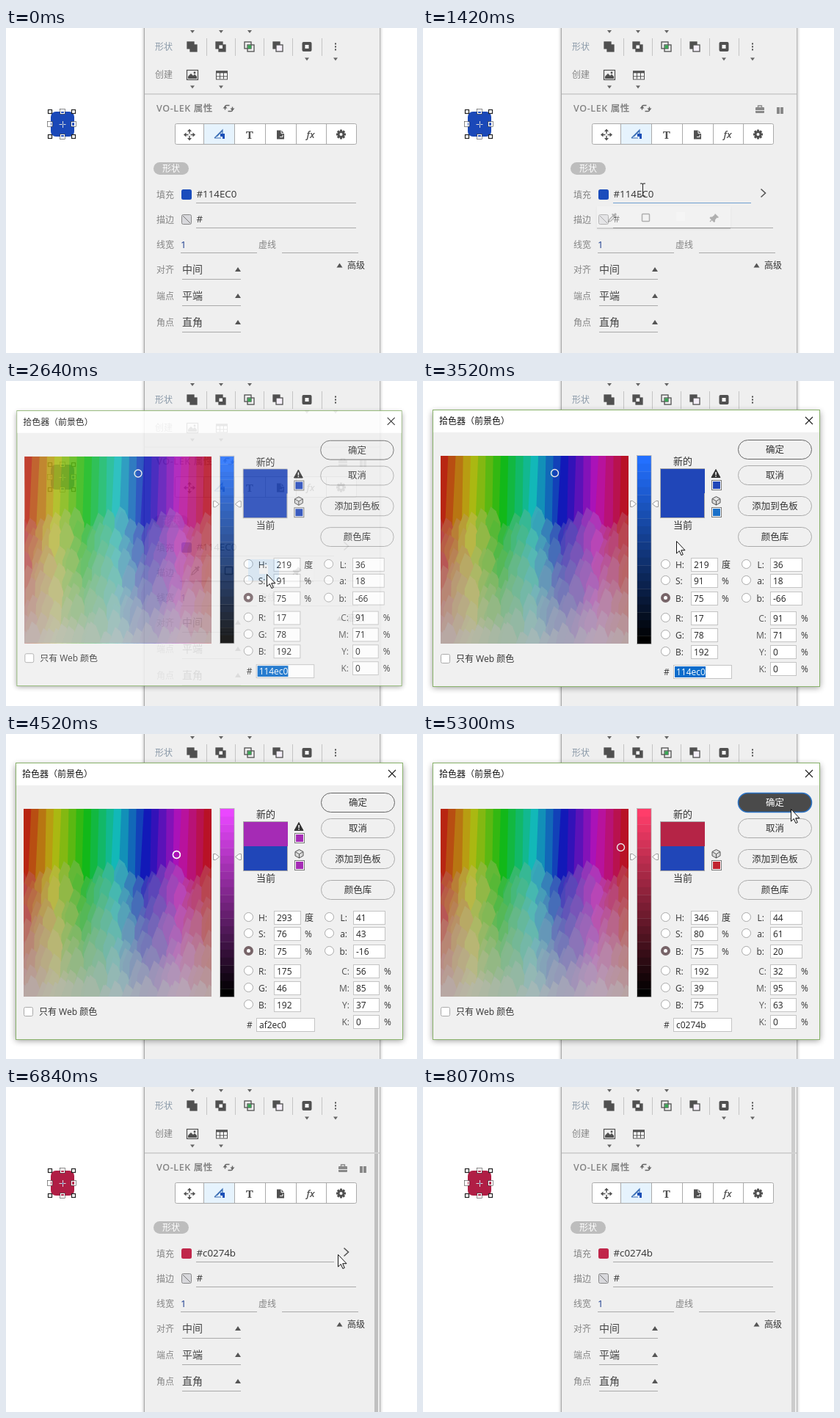
Write an HTML page that moves like this. It is 560 px wide and 443 px high and loops after 8.18 s.

```html
<!DOCTYPE html>
<html lang="zh">
<head>
<meta charset="utf-8">
<style>
html, body { margin: 0; width: 100%; height: 100%; overflow: hidden; background: #fff; }
svg { display: block; width: 560px; height: 443px; font-family: 'Open Sans', 'Noto Sans CJK SC', 'Noto Sans CJK', sans-serif; white-space: pre; }
</style>
</head>
<body>
<svg id="stage" viewBox="0 0 560 443"></svg>
<script>
const LOOP = 8180;
// Bursts of motion: start, end, number of pictures
const BURSTS = [[310, 1100, 8], [1420, 2200, 8], [2300, 2300, 1], [2520, 2740, 3], [2960, 3740, 8], [3860, 4640, 8],
  [4760, 5300, 6], [5520, 5640, 2], [5850, 6620, 8], [6740, 6840, 2], [7060, 7630, 6], [8070, 8070, 1]];
const POINTER = [[310, 487, 390], [700, 410, 310], [1100, 299, 218], [1420, 299, 220], [1760, 316, 250], [2200, 355, 263],
  [2740, 355, 263], [3180, 400, 310], [3517, 345, 218], [3740, 340, 160], [3860, 305, 140], [4080, 180, 126],
  [4300, 213, 170], [4640, 269, 154], [4760, 285, 152], [5190, 480, 107], [5300, 501, 102], [5520, 500, 101],
  [5640, 498, 100], [5850, 494, 112], [6620, 458, 229], [6840, 452, 228], [7060, 440, 252], [7518, 334, 432], [7630, 332, 450]];

const text = (x, y, s, size = 12, fill = '#333', extra = '') =>
  `<text x="${x}" y="${y}" font-size="${size}" fill="${fill}" ${extra}>${s}</text>`;
const rect = (x, y, w, h, fill, extra = '') =>
  `<rect x="${x}" y="${y}" width="${w}" height="${h}" fill="${fill}" ${extra}/>`;
const line = (x1, y1, x2, y2, stroke = '#aaa', extra = '') =>
  `<path d="M${x1} ${y1}L${x2} ${y2}" stroke="${stroke}" fill="none" ${extra}/>`;
const path = (d, fill, extra = '') => `<path d="${d}" fill="${fill}" ${extra}/>`;
const at = (x, y, s, id = '') => `<g ${id && `id="${id}"`} transform="translate(${x} ${y})">${s}</g>`;
const down = (x, y) => path(`M${x - 3} ${y - 2}h6l-3 4z`, '#666');
const up = (x, y) => path(`M${x - 4} ${y + 3}h8l-4 -6z`, '#555');
const MID = 'text-anchor="middle"', END = 'text-anchor="end"';
const INK = '#505050', LABEL = '#858585';

function hsv(h, s, v) {
  const ch = n => {
    const k = (n + h / 60) % 6;
    return Math.round(255 * v * (1 - s * Math.max(0, Math.min(k, 4 - k, 1))));
  };
  return [ch(5), ch(3), ch(1)];
}
const css = c => `rgb(${c})`;

function toolIcons() {
  const pair = (a, b) => rect(-6.5, -6.5, 9, 9, a, `stroke="${INK}" stroke-width="1.3"`) +
    rect(-2.5, -2.5, 9, 9, b, `stroke="${INK}" stroke-width="1.3"`);
  return at(253.5, 25.5, pair(INK, INK)) +
    at(292.5, 25.5, pair(INK, INK) + rect(-2, -2, 4.5, 4.5, '#fff')) +
    at(331.5, 25.5, pair('#efefef', 'none') + rect(-2, -2, 4.5, 4.5, '#3aa655')) +
    at(370.5, 25.5, pair(INK, '#f4eef8')) +
    at(410, 25.5, rect(-6.5, -6.5, 13, 13, INK, 'rx="2"') + rect(-2.5, -2.5, 5, 5, '#fff')) +
    at(449, 25.5, [-4, 0, 4].map(y => rect(-1, y - 1, 2, 2, INK)).join('')) +
    [273, 312, 351, 390, 430].map(x => line(x + .5, 14, x + .5, 38, '#c4c4c4')).join('') +
    [254, 293, 332].map(x => down(x, 5)).join('') + down(410, 42.5) + down(449, 42.5) + down(254, 80.5) + down(293, 80.5) +
    at(254, 64, rect(-7.5, -6.5, 15, 13, '#efefef', `stroke="${INK}" stroke-width="1.2"`) +
      path('M-6 5v-3l4-4 3 3 2-2 3 3v3z', INK) + `<circle cx="3" cy="-3" r="1.4" fill="${INK}"/>`) +
    at(294, 64.5, rect(-7.5, -5.5, 15, 11, '#fff', `stroke="${INK}"`) + rect(-8, -6, 16, 3, INK) +
      path('M-7.5 1.5h15M-2.5 -5v10M2.5 -5v10', 'none', `stroke="${INK}"`));
}

function tabs() {
  const gear = [0, 45, 90, 135].map(a => rect(-1.5, -6.5, 3, 13, INK, `transform="rotate(${a})"`)).join('') +
    `<circle r="4.8" fill="${INK}"/><circle r="2" fill="#fff"/>`;
  return rect(230.5, 130.5, 247, 28, '#fff', 'stroke="#aaa" rx="2"') + rect(270, 131, 41, 27, '#e6f3fd') +
    [269.5, 311.5, 353.5, 395.5, 436.5].map(x => line(x, 131, x, 158)).join('') +
    at(250, 145.5, path('M-6 0h12M0 -6v12', 'none', `stroke="${INK}" stroke-width="1.4" stroke-dasharray="4.5 3"`) +
      path('M0 -8l3 3.5h-6zM0 8l3 -3.5h-6zM-8 0l3.5 -3v6zM8 0l-3.5 -3v6z', INK)) +
    at(291, 145, path('M-7 5L4 -6V-1M-7 5H2M-4 3L4 -5', 'none', 'stroke="#3c6fb5" stroke-width="1.2"') +
      path('M1 -1h6v7h-3v-3h-3z', '#1a50b8')) +
    text(332, 151, 'T', 15, INK, MID + ' font-weight="800" font-family="\'Noto Serif\',serif"') +
    at(374, 145.5, path('M-5 -6h6l4 4v8h-10z', INK) + path('M1 -6v4h4M-1 3h4v-3', 'none', 'stroke="#fff"')) +
    text(415, 150, 'fx', 13, INK, MID + ' font-style="italic" font-weight="600"') + at(456.5, 145, gear);
}

function panel() {
  const choice = (y, label, value) => text(205, y + 4.5, label, 12, LABEL) + text(240, y + 5, value, 14, '#444') +
    up(316, y) + line(240, y + 13.5, 320, y + 13.5);
  return rect(188, -3, 322, 450, '#efefef', 'filter="url(#soft)"') + rect(188, 0, 322, 443, '#efefef') +
    line(188.5, 0, 188.5, 443, '#aaa') + line(509.5, 0, 509.5, 443, '#b8b8b8') +
    rect(502, 0, 5, 443, '#c0c0c0', 'id="scrollbar"') + rect(189, 89, 320, 2, '#d2d2d2') +
    text(203, 30, '形状', 12, '#8a99a8') + text(203, 68, '创建', 12, LABEL) + toolIcons() +
    text(205, 114, 'VO-LEK 属性', 12.5, '#858585', 'letter-spacing=".6" font-weight="600"') +
    at(303.5, 109.5, path('M-5 2v-4q0 -2 2 -2h4M5 -2v4q0 2 -2 2h-4', 'none', 'stroke="#666" stroke-width="1.4"') +
      path('M-8 0h6l-3 -3.5zM8 0h-6l3 3.5z', '#666')) +
    `<g id="headIcons">${rect(474.5, 99.5, 24, 24, '#fff', 'id="pauseBox" stroke="#ddd"')}
      ${rect(453, 108, 12, 8, '#888', 'rx="1"')}${path('M456.5 108v-2h5v2', 'none', 'stroke="#888" stroke-width="1.3"')}
      ${line(453, 112.5, 465, 112.5, '#efefef')}${rect(482, 108, 4, 9, '#888')}${rect(487, 108, 4, 9, '#888')}</g>` +
    tabs() + rect(201, 183, 48, 17, '#bdbdbd', 'rx="8.5"') + text(225, 196, '形状', 12, '#fff', MID) +
    text(205, 231.5, '填充', 12, LABEL) + rect(239, 220, 14, 14, '#1a4cbc', 'rx="2.5" id="fillChip"') +
    text(259.5, 231, '', 13.3, '#333', 'id="fillHex"') + path('', 'none', 'id="fillLine"') +
    path('M460.5 219.5l6 5.5 -6 5.5', 'none', 'id="chevron" stroke="#555" stroke-width="1.6"') +
    text(205, 265.5, '描边', 12, LABEL) + rect(239.5, 254.5, 13, 13, '#d8d8dc', 'rx="2" stroke="#888"') +
    line(241, 256, 251, 266, '#777') + text(259.5, 265, '#', 13.3) + line(259, 272.5, 477, 272.5) +
    text(205, 299.5, '线宽', 12, LABEL) + text(238, 299.5, '1', 13.3, '#1f3f8f') + line(238, 306.5, 342, 306.5) +
    text(344, 299.5, '虚线', 12, LABEL) + line(376, 306.5, 480, 306.5) +
    choice(329, '对齐', '中间') + choice(365, '端点', '平端') + choice(401, '角点', '直角') +
    up(454.5, 323.5) + text(465, 328, '高级', 12);
}

function shape() {
  let s = rect(61, 114, 32, 34, '#1a48b8', 'rx="7" id="shape"');
  for (const x of [60, 77, 92]) for (const y of [114, 131, 148]) {
    if (x === 77 && y === 131) continue;
    const outer = x !== 77 && y !== 131;
    s += rect(x - 2.5, y - 2.5, 5, 5, outer ? '#fff' : 'none', `stroke="${outer ? '#222' : '#fff'}" stroke-width="1.2"`);
    if (!outer) s += rect(x - 3.5, y - 3.5, 7, 7, 'none', 'stroke="#444" stroke-width=".6"');
  }
  return s + path('M72.5 131.5h9M77.5 127v9', 'none', 'stroke="#ddd"') + rect(76.5, 130.5, 2, 2, '#6688cc');
}

function popup() {
  return rect(237, 245, 182, 29, '#000', 'opacity=".35" filter="url(#soft)"') + rect(237, 243, 182, 29, '#f7f7f7') +
    rect(330, 243, 42, 29, '#40a4ff', 'id="popHover"') +
    at(258, 258, path('M-5 6l1 -3 5 -5 2 2 -5 5z', 'none', `stroke="${INK}" stroke-width="1.3"`) +
      path('M-1 -4l1 -1 2 1 2 -2 2 2 -2 2 1 2 -1 1z', INK)) +
    rect(298.5, 253.5, 10, 10, 'none', `stroke="${INK}" stroke-width="1.5" rx="1"`) +
    rect(345, 251, 12, 12, '#fff') +
    at(397, 258, path('M1 -5l5 5 -1.5 1 -1 -.5 -2.500 3 0 2.500 -1.500 1 -6 -6 1 -1.500h2.500l3 -2.500z', INK) +
      line(-1, 1, -6, 6, INK, 'stroke-width="1.3"'));
}

// Hue runs across, saturation falls downward in ragged scales
function spectrum() {
  let seed = 7, s = '';
  const rnd = () => (seed = seed * 16807 % 2147483647) / 2147483647;
  const cols = 25, rows = 9, w = 256 / cols;
  for (let r = 0; r < rows; r++) for (let c = -1; c <= cols; c++) {
    const x = c * w + (r ? (rnd() - .5) * w : 0);
    const wave = 14 * Math.sin(c * .9 + r * .5) * (1 - r / rows);
    const y = r ? 58 + r * 22 + wave + (rnd() - .5) * 14 : 0;
    const hue = Math.min(359, Math.max(0, (x + w / 2) / 256 * 360));
    const col = css(hsv(hue, r ? .76 * (1 - r / rows) + .03 : .9, .72));
    if (!r) s += path(`M${x} 0h${w + 1}l${(rnd() - .5) * 14} 256h${-w - 9}z`, col);
    else s += path(`M${x - 6} 256L${x - 4} ${y + 18}L${x + 3} ${y}L${x + w} ${y + 6}L${x + w + 6} ${y + 22}V256z`, col);
  }
  return `<svg x="24" y="102" width="256" height="256" overflow="hidden">${s}</svg>`;
}

function dialog() {
  const field = (x, y, w, id) => rect(x + .5, y - 8.5, w, 18, '#fff', 'stroke="#c4c4c4"') + text(x + 4, y + 5, '', 12, '#222', `id="${id}"`);
  const radio = (x, y, on) => `<circle cx="${x}" cy="${y}" r="${on ? 4.5 : 6}" fill="#fff" stroke="${on ? '#776468' : '#aaa'}" stroke-width="${on ? 4 : 1}"/>`;
  const left = [250, 272, 296, 323, 346, 369].map((y, i) => radio(330.5, y - .5, i === 2) + text(344, y + 5, 'HSBRGB'[i] + ':') +
    field(365, y, 36, 'l' + i) + (i < 3 ? text(407, y + 5, i ? '%' : '度') : '')).join('');
  const right = [250, 272, 296, 323, 346, 369, 392].map((y, i) => (i < 3 ? radio(440.5, y - .5) : text(515, y + 5, '%')) +
    text(i < 3 ? 465 : 468, y + 5, 'LabCMYK'[i] + ':', 12, i < 3 ? '#333' : '#555', END) + field(473, y, i < 3 ? 43 : 35, 'r' + i)).join('');
  const button = (y, s, id) => rect(429.5, y - 13, 100, 26, '#f0f0f0', `rx="13" stroke="${id ? '#666' : '#aaa'}" ${id ? 'id="ok"' : ''}`) +
    text(479.5, y + 4.5, s, 12.5, '#333', MID + (id ? ' id="okText"' : ''));
  const chip = (y, id) => rect(393.5, y + .5, 13, 13, '#fff', 'stroke="#777"') + rect(395, y + 2, 10, 10, '#1a46b8', `id="${id}"`);
  const bars = Array.from({ length: 24 }, (_, i) => rect(292, 102 + i * 256 / 24, 19, 11, '#000', 'class="bar"')).join('');
  return rect(13, 42, 528, 376, '#000', 'opacity=".4" filter="url(#shade)"') + rect(13.5, 39.5, 527, 377, '#f0f0f0', 'stroke="#8ab36c"') +
    rect(14, 40, 526, 30, '#fff') + text(22, 59, '拾色器（前景色）', 12, '#111') +
    path('M521 49l10 10M531 49l-10 10', 'none', 'stroke="#222" stroke-width="1.2"') + spectrum() +
    '<circle id="marker" r="5" fill="none" stroke="#e8e8e8" stroke-width="1.4"/>' + bars + rect(291.5, 101.5, 19.5, 257, 'none', 'stroke="#aaa" stroke-width=".7"') +
    path('M282.5 163.500h3l5 4 -5 4h-3zM320.500 163.500h-3l-5 4 5 4h3z', '#fff', 'stroke="#999"') +
    text(354, 114, '新的', 13, '#333', MID) + text(354, 201, '当前', 13, '#333', MID) +
    rect(323.5, 119.5, 60, 67, '#2046b8', 'stroke="#aaa"') + rect(324, 120, 60, 33, '#2046b8', 'id="fresh"') +
    `<g id="warning">${path('M399 120.5l6 11h-12z', '#333', 'stroke="#333" stroke-linejoin="round"')}${rect(398.3, 124, 1.5, 4, '#fff')}${rect(398.3, 129, 1.5, 1.5, '#fff')}${chip(135, 'gamut')}</g>` +
    path('M399.500 157.500l5.500 3v5.500l-5.500 3 -5.500 -3v-5.500zM394 160.500l5.500 3 5.500 -3M399.500 163.500v5.500', '#d8d8d8', 'stroke="#555" stroke-linejoin="round"') + chip(172, 'web') +
    button(93.5, '确定', 1) + button(128.5, '取消') + button(170.5, '添加到色板') + button(212.5, '颜色库') + left + right +
    text(328, 401, '#') + field(341, 396, 79, 'hex') + rect(343, 389, 42, 15, '#0a6ccb', 'id="hexPick"') + text(345, 401, '114ec0', 12, '#fff', 'id="hexSel"') +
    rect(24.5, 372.5, 12, 12, '#fff', 'rx="2" stroke="#aaa"') + text(45, 383, '只有 Web 颜色');
}

document.getElementById('stage').innerHTML = `<defs>
  <filter id="soft" x="-10%" y="-30%" width="120%" height="160%"><feDropShadow dx="0" dy="0" stdDeviation="2" flood-opacity=".35"/></filter>
  <filter id="shade" x="-5%" y="-5%" width="110%" height="110%"><feGaussianBlur stdDeviation="4"/></filter></defs>` +
  rect(0, 0, 560, 443, '#fff') + shape() + panel() + `<g id="popup">${popup()}</g><g id="dialog">${dialog()}</g>` +
  at(0, 0, path('M0 0V16.500L3.800 13 6.400 19 8.800 18 6.200 12.200H11.500Z', '#fff', 'id="arrow" stroke="#111" stroke-linejoin="round"') +
    path('M-3.500 -8.500h3l.5 1 .5 -1h3M0 -8v16M-3.500 8.500h3l.5 -1 .5 1h3', 'none', 'id="beam" stroke="#222"') +
    '<circle id="ring" r="5" fill="none" stroke="#fff" stroke-width="1.3"/>', 'pointer');

const $ = id => document.getElementById(id);
const set = (id, attrs) => { for (const k in attrs) $(id).setAttribute(k, attrs[k]); };
const show = (id, on) => set(id, { visibility: on ? 'inherit' : 'hidden' });
const bars = [...document.querySelectorAll('.bar')];
const lerp = (a, b, k) => a + (b - a) * k;
const within = (v, a, b) => v >= a && v < b;

function snap(t) {
  let last = 0;
  for (const [a, b, n] of BURSTS) {
    if (t < a) break;
    const gap = n > 1 ? (b - a) / (n - 1) : 1;
    last = a + Math.min(n - 1, Math.floor((t - a + 3) / gap)) * gap;
  }
  return last;
}
function pointerAt(t) {
  const i = POINTER.findIndex(k => k[0] > t);
  if (i === 0) return [-50, -50];
  if (i < 0) return [332, 470];
  const [a, b] = [POINTER[i - 1], POINTER[i]], k = (t - a[0]) / (b[0] - a[0]);
  return [lerp(a[1], b[1], k), lerp(a[2], b[2], k)];
}

function drawPicker(t, px, py) {
  const [mx, my] = t < 4080 ? [179.5, 125.5] : t < 4640 ? [px, py] : [269.5, 154.5];
  const mix = Math.min(1, Math.max(0, (mx - 179.5) / 90));
  const edge = mix === 0 || mix === 1;
  const h = mix === 0 ? 219 : mix === 1 ? 346 : Math.round((mx - 24) / 256 * 360);
  const s = mix === 0 ? 91 : mix === 1 ? 80 : Math.round((358 - my) / 2.56);
  const rgb = edge ? (mix ? [192, 39, 75] : [17, 78, 192]) : hsv(h, s / 100, .753);
  const blend = (a, b) => a.map((v, i) => Math.round(lerp(v, b[i], mix)));
  const hex = rgb.map(v => v.toString(16).padStart(2, '0')).join('');
  [h, s, 75, ...rgb].forEach((v, i) => $('l' + i).textContent = v);
  blend([36, 18, -66, 91, 71, 0, 0], [44, 61, 20, 32, 95, 63, 0]).forEach((v, i) => $('r' + i).textContent = v);
  $('hex').textContent = mix ? hex : '';
  show('hexPick', !mix);
  show('hexSel', !mix);
  set('marker', { cx: mx, cy: my });
  bars.forEach((b, i) => b.setAttribute('fill', css(hsv(h, s / 100 * .95, 1 - i / 23))));
  const tone = mix ? css(hsv(h, s / 100, .71)) : '#2046b8';
  set('fresh', { fill: tone });
  set('gamut', { fill: tone });
  set('web', { fill: mix === 1 ? '#c0242f' : mix ? tone : t < 2740 ? '#2046b8' : '#1a70c8' });
  show('warning', mix < .8);
}

function draw(now) {
  const t = snap(now), [px, py] = pointerAt(t);
  const open = within(t, 2520, 5640), red = t >= 5850;
  const fade = t < 2600 ? .45 : t < 2700 ? .87 : t < 5500 ? 1 : .4;
  const zoom = 1 - (1 - fade) * .04;
  show('dialog', open);
  set('dialog', { opacity: fade, transform: `translate(277 228) scale(${zoom}) translate(-277 -228)` });
  if (open) drawPicker(t, px, py);

  const pop = within(t, 1420, 5500);
  show('popup', pop);
  set('popup', { opacity: t < 1500 ? .4 : t < 1600 ? .8 : 1 });
  const cell = [237, 284, 330, 372, 419].findIndex(x => x > px) - 1;
  show('popHover', pop && py > 243 && t < 5500);
  set('popHover', t > 2200 || cell === 2 ? { x: 330, width: 42 } : { x: 284, width: 46 });

  const hover = within(t, 980, 5500) || (t > 6500 && t < 7060);
  set('fillLine', { d: `M259 238.5H${hover ? 447 : 477}`, stroke: within(t, 1420, 2300) ? '#6f9fd0' : '#aaa' });
  show('chevron', hover);
  $('fillHex').textContent = red ? '#c0274b' : '#114EC0';
  set('fillChip', { fill: red ? '#c0274b' : '#1a4cbc' });
  set('shape', { fill: red ? '#b01e45' : '#1a48b8' });
  show('headIcons', within(t, 310, 7600));
  show('pauseBox', within(t, 5640, 6000) && px > 474 && py < 124);
  show('scrollbar', t >= 5640);
  set('scrollbar', { fill: t < 7600 ? '#c0c0c0' : t < 8000 ? '#c6c6c6' : '#cccccc' });

  const pressed = open && px > 429 && within(py, 80, 107);
  set('ok', { fill: pressed ? '#4a4a4a' : '#f0f0f0', stroke: pressed ? '#2a72c4' : '#666', 'stroke-width': pressed ? 1.6 : 1 });
  set('okText', { fill: pressed ? '#fff' : '#333' });

  const ring = open && within(px, 24, 280) && within(py, 102, 358);
  const beam = !open && within(px, 259, 447) && within(py, 209, 240);
  set('pointer', { transform: `translate(${Math.round(px) + .5} ${Math.round(py) + .5})` });
  show('ring', ring);
  show('beam', beam);
  show('arrow', !ring && !beam && t >= 310 && t < 7630);
}

const begin = performance.now();
function tick() {
  draw((performance.now() - begin) % LOOP);
  requestAnimationFrame(tick);
}
tick();
</script>
</body>
</html>
```
